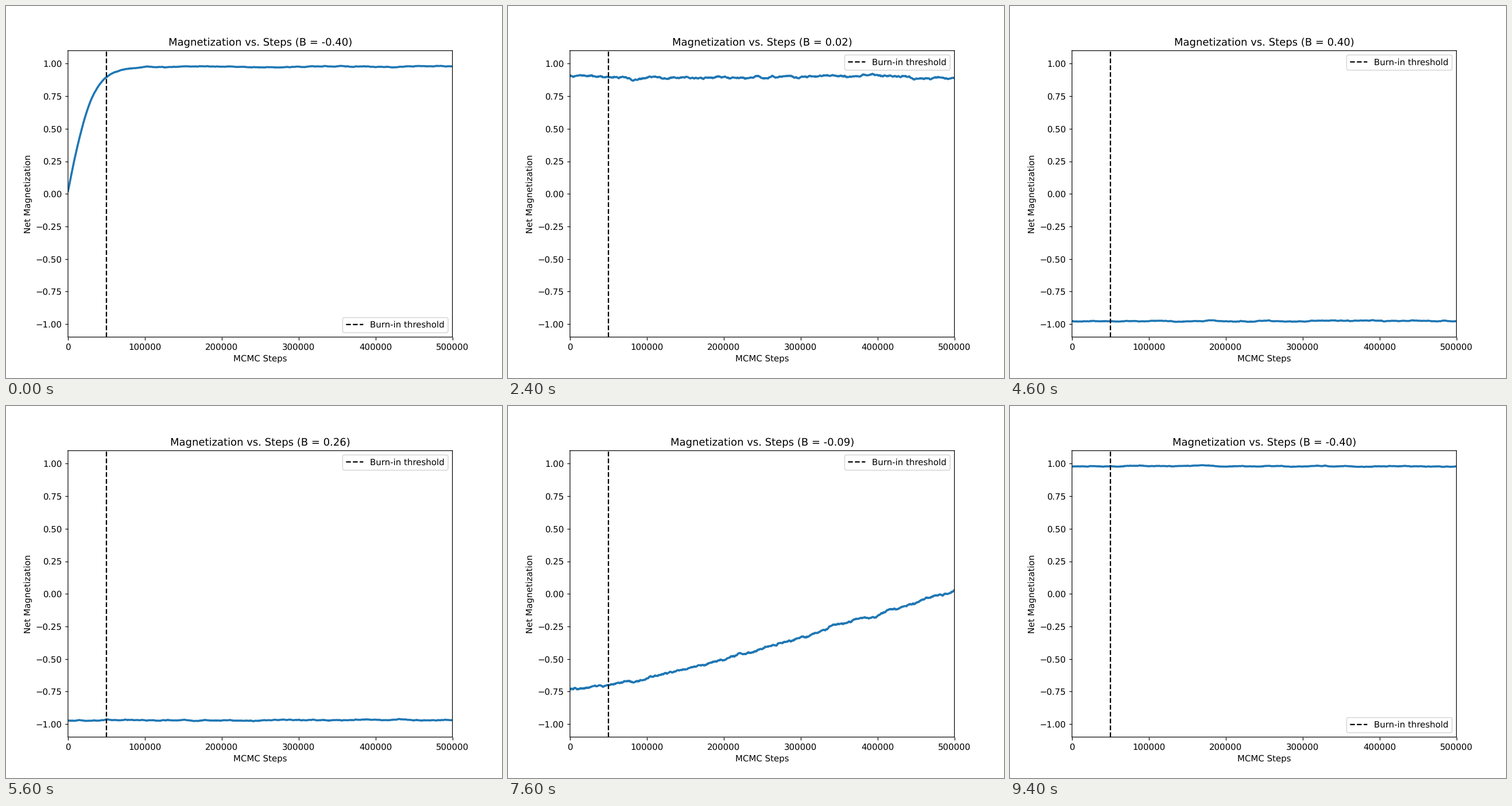
Write a matplotlib script that moves like this. It is 864 px wide and 648 px high and loops after 9600 ms.

```python
import numpy as np
import matplotlib.pyplot as plt
from matplotlib.animation import FuncAnimation

# Unhinted glyphs and unsnapped lines give a soft, subpixel look.
plt.rcParams.update({"text.hinting": "none", "path.snap": False})

HALF = 24
FRAMES = 2 * HALF
SAMPLES = 1001
STEPS = 500000

ramp = np.linspace(-0.4, 0.4, HALF)
fields = np.concatenate([ramp, ramp[::-1]])
u = np.linspace(0, 1, SAMPLES)  # progress through one run

# The spins flip over three runs, once on each way of the sweep.
FALL, RISE = 13, 37
FLIP_ENDS = (0.735, -0.03, -0.945)


def settled(sign, field):
    """Level a run relaxes to while it keeps its sign."""
    return sign * (0.984 - 0.084 * np.exp(sign * field / 0.14))


def noise(rng, size):
    """Correlated random walk, pinned to zero at both ends."""
    kicks = rng.normal(0, size * 0.24, SAMPLES)
    walk = np.zeros(SAMPLES)
    for n in range(1, SAMPLES):
        walk[n] = 0.97 * walk[n - 1] + kicks[n]
    return walk - u * walk[-1]


def course(i, last):
    """Smooth path of run i, starting at the level where the last one ended."""
    for start, sign in ((FALL, 1), (RISE, -1)):
        stage = i - start
        if 0 <= stage < 3:
            ease = u ** 1.3 if stage < 2 else 1 - (1 - u) ** 3
            return last + (sign * FLIP_ENDS[stage] - last) * ease
    sign = -1 if FALL < i < RISE else 1
    goal = settled(sign, fields[i])
    if i == 0:
        return last + (goal - last) * np.tanh(15.6 * u)
    return goal + (last - goal) * np.exp(-15 * u)


def simulate():
    rng = np.random.default_rng(7)
    runs, last = [], 0.02
    for i in range(FRAMES):
        path = course(i, last)
        size = min(0.0015 + 0.06 * (1 - abs(path[-1])), 0.009)
        runs.append(path + noise(rng, size))
        last = path[-1]
    return runs


runs = simulate()

fig, ax = plt.subplots(figsize=(8, 6), dpi=108)
line, = ax.plot(u * STEPS, runs[0], lw=2.4)
ax.axvline(50000, color="black", ls="--", label="Burn-in threshold")
ax.set_xlim(0, STEPS)
ax.set_ylim(-1.1, 1.1)
ax.set_xlabel("MCMC Steps")
ax.set_ylabel("Net Magnetization")
ax.legend(loc="best")


def update(i):
    line.set_ydata(runs[i])
    ax.set_title(f"Magnetization vs. Steps (B = {fields[i]:.2f})")
    return line,


anim = FuncAnimation(fig, update, frames=FRAMES, interval=200,
                     repeat=True, repeat_delay=0)
plt.show()
```
